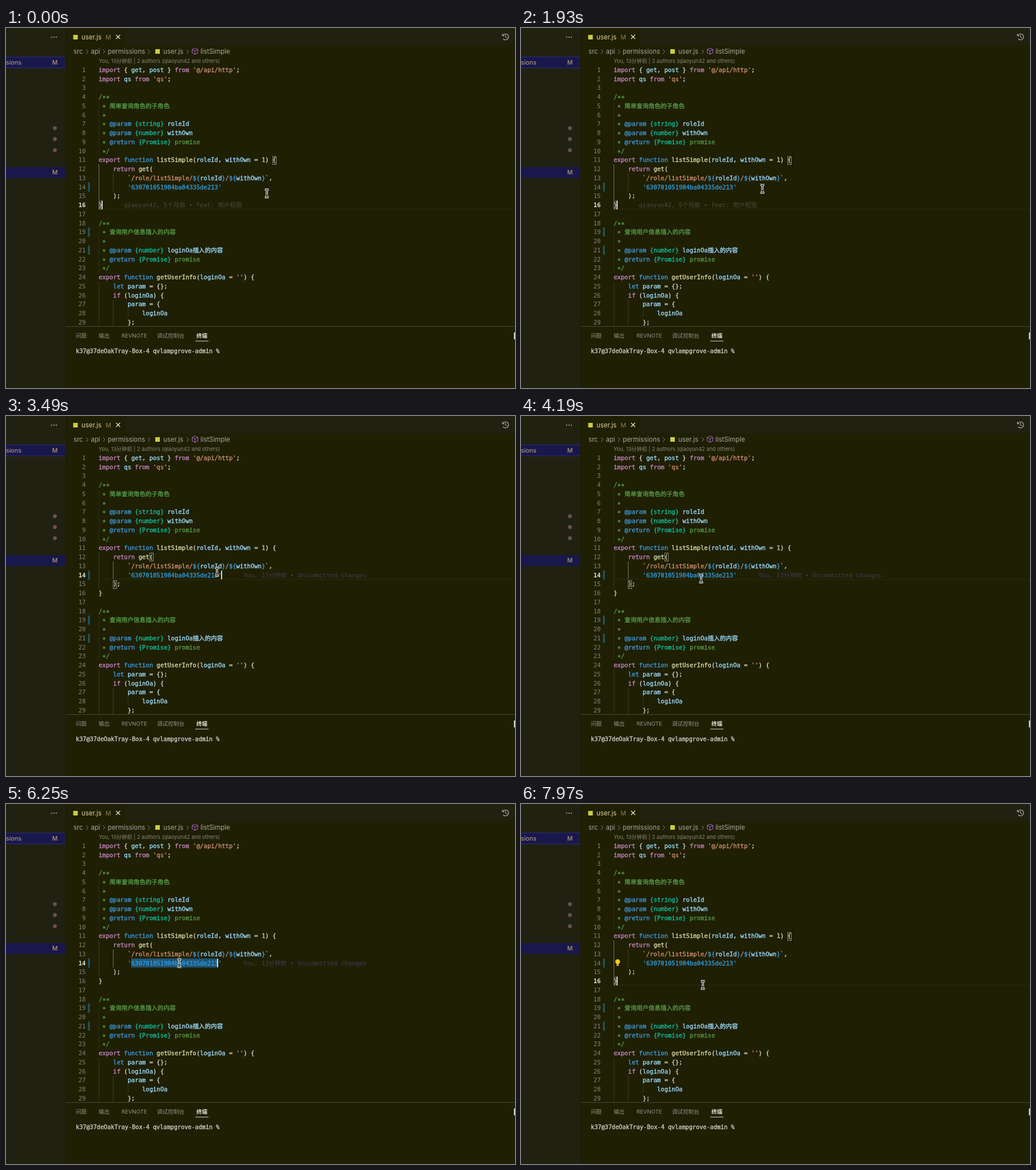
Recreate the animation shown at these times as an HTML page with a canvas. Size 890 px wide and 629 px high, loop 8 s.

```html
<!DOCTYPE html>
<html lang="zh">
<head>
<meta charset="utf-8">
<title>Editor</title>
<style>
  html, body { margin: 0; width: 100%; height: 100%; overflow: hidden; background: #1f1f03; }
  canvas { display: block; }
</style>
</head>
<body>
<canvas id="stage" width="890" height="629"></canvas>
<script>
const ctx = document.getElementById('stage').getContext('2d');
const LOOP = 8000;
const MONO = '"DejaVu Sans Mono", "Noto Sans CJK SC", monospace';
const UI = 'Inter, "Noto Sans CJK SC", sans-serif';
const BG = '#1f1f03', SIDE = '#212112';
const LEFT = 162, CELL = 6.333, ROW = 15.75, SIZE = 10.52;

const COLORS = {
  k: '#c586c0', b: '#3f9bdc', v: '#9cdcfe', w: '#d8d8d0', s: '#d08f70',
  h: '#2f9de0', c: '#559a48', t: '#10bfa0', f: '#dcdcaa', n: '#b5cea8'
};

// Each run is "colour key ~ text", runs are split by "|".
const CODE = [
  "k~import |w~{ |v~get|w~, |v~post |w~} |k~from |s~'@/api/http'|w~;",
  "k~import |v~qs |k~from |s~'qs'|w~;",
  "",
  "c~/**",
  "c~ * 简单查询角色的子角色",
  "c~ *",
  "c~ * |b~@param |t~{string} |v~roleId",
  "c~ * |b~@param |t~{number} |v~withOwn",
  "c~ * |b~@return |t~{Promise} |c~promise",
  "c~ */",
  "k~export |b~function |f~listSimple|w~(|v~roleId|w~, |v~withOwn |w~= |n~1|w~) {",
  "k~    return |f~get|w~(",
  "s~        `/role/listSimple/|b~${|v~roleId|b~}|s~/|b~${|v~withOwn|b~}|s~`|w~,",
  "h~        '630701051984ba04335de213'",
  "w~    );",
  "w~}",
  "",
  "c~/**",
  "c~ * 查询用户信息插入的内容",
  "c~ *",
  "c~ * |b~@param |t~{number} |v~loginOa插入的内容",
  "c~ * |b~@return |t~{Promise} |c~promise",
  "c~ */",
  "k~export |b~function |f~getUserInfo|w~(|v~loginOa |w~= |s~''|w~) {",
  "b~    let |v~param |w~= {};",
  "k~    if |w~(|v~loginOa|w~) {",
  "v~        param |w~= {",
  "v~            loginOa",
  "w~        };"
].map(line => line ? line.replace(/\*/g, '∗').split('|').map(run => run.split('~')) : []);

// Pointer path: time, x, y
const PATH = [
  [0, 456, 289], [20, 456, 289], [900, 450, 291], [1660, 422, 281], [2000, 422, 281],
  [2380, 384, 278], [2900, 384, 278], [3490, 369, 272], [4190, 315, 284],
  [4400, 315, 284], [5200, 303, 278], [6800, 303, 278], [7550, 318, 316], [8000, 318, 316]
];

const CLICK = 2400, SELECT = 6050, LEAVE = 7750;

const rowY = n => 73 + ROW * (n - 1);
const colX = c => LEFT + CELL * c;

function rect(x, y, w, h, color) {
  ctx.fillStyle = color;
  ctx.fillRect(x, y, w, h);
}

function text(str, x, y, color, size, family = UI, weight = 400, align = 'left') {
  ctx.font = `${weight} ${size}px ${family}`;
  ctx.textAlign = align;
  ctx.fillStyle = color;
  ctx.fillText(str, x, y + size * 0.36);
  return ctx.measureText(str).width;
}

// Monospaced text, thickened slightly by an outline
function mono(str, x, y, color, size = SIZE, extra = 0.35) {
  const width = text(str, x, y, color, size, MONO);
  ctx.strokeStyle = color;
  ctx.lineWidth = extra;
  ctx.strokeText(str, x, y + size * 0.36);
  return width;
}

function line(points, color, width = 1) {
  ctx.strokeStyle = color;
  ctx.lineWidth = width;
  ctx.beginPath();
  points.forEach(([x, y], i) => i ? ctx.lineTo(x, y) : ctx.moveTo(x, y));
  ctx.stroke();
}

function disc(x, y, r, color) {
  ctx.fillStyle = color;
  ctx.beginPath();
  ctx.arc(x, y, r, 0, Math.PI * 2);
  ctx.fill();
}

function sidebar() {
  rect(0, 0, 105, 629, SIDE);
  for (const y of [51, 243]) {
    rect(0, y, 103, 19, '#18184c');
    text('M', 85.5, y + 9, '#b49a6c', 10.5, UI, 500, 'center');
  }
  rect(0, 50, 103, 1, '#28287c');
  rect(0, 69, 103, 1, '#28287c');
  text('sions', 0, 60, '#c4aa7c', 10.8);
  for (const y of [175, 194, 213.5]) disc(85.5, y, 3.4, '#695050');
  for (const x of [80, 84, 88]) disc(x, 16, 0.9, '#c8c8c0');
  rect(104, 0, 1, 629, '#1a1a06');
}

function cube(x, y) {
  const c = '#a868c8';
  line([[x, y - 5.5], [x + 5, y - 3], [x + 5, y + 3], [x, y + 5.5],
        [x - 5, y + 3], [x - 5, y - 3], [x, y - 5.5]], c);
  line([[x - 5, y - 3], [x, y - 0.5], [x + 5, y - 3]], c);
  line([[x, y - 0.5], [x, y + 5.5]], c);
}

function header() {
  rect(209, 0, 681, 30, SIDE);
  rect(117.5, 12, 8, 8, '#cbcb41');
  text('user.js', 132, 16, '#e2cf9c', 11.4);
  text('M', 179, 16, '#968259', 10.5, UI, 400, 'center');
  line([[192.5, 12], [199.5, 19]], '#e8e8e0', 1.2);
  line([[199.5, 12], [192.5, 19]], '#e8e8e0', 1.2);

  const grey = '#a8a8a0';
  [['src', 118], ['api', 148.5], ['permissions', 178], ['user.js', 275], ['listSimple', 340]]
    .forEach(([label, x]) => text(label, x, 41, grey, 11.4));
  for (const x of [140, 169.5, 248, 316])
    line([[x, 37.5], [x + 3.5, 41.3], [x, 45]], '#88887f');
  rect(261, 37, 8, 8, '#cbcb41');
  cube(330.5, 40.5);

  // History clock
  ctx.strokeStyle = '#b8b8b0';
  ctx.lineWidth = 1.1;
  ctx.beginPath();
  ctx.arc(873.5, 15.5, 5.3, -2.7, 2.5);
  ctx.stroke();
  line([[868, 10], [868, 13.7], [871.5, 13.7]], '#b8b8b0');
  line([[873.5, 12], [873.5, 16], [876.5, 17.5]], '#b8b8b0');
}

function guides(onBlock) {
  const dim = '#3a3a2c', lit = '#75756c';
  const guide = (col, from, to, color) =>
    rect(Math.round(colX(col)), rowY(from) - ROW / 2, 1, ROW * (to - from + 1), color);
  guide(0, 5, 10, '#2b2b18');
  guide(0, 12, 15, onBlock ? lit : dim);
  guide(4, 13, 14, onBlock ? dim : lit);
  guide(0, 19, 23, '#2b2b18');
  guide(0, 25, 29, dim);
  guide(4, 27, 29, dim);
  guide(8, 28, 28, dim);
}

function changeMark(n) {
  const y = rowY(n) - ROW / 2;
  ctx.save();
  ctx.beginPath();
  ctx.rect(143.5, y, 3, ROW);
  ctx.clip();
  for (let d = -2; d < ROW + 4; d += 3)
    line([[143, y + d + 2], [147, y + d - 2]], '#1f86b4', 1.3);
  ctx.restore();
}

function code(active) {
  CODE.forEach((runs, i) => {
    const n = i + 1, y = rowY(n), on = n === active;
    text(String(n), 139.3, y, on ? '#e0e0d8' : '#85857c', SIZE, MONO, on ? 700 : 400, 'right');
    ctx.textAlign = 'left';
    let x = LEFT;
    for (const [key, str] of runs) x += mono(str, x, y, COLORS[key]);
  });
  [14, 19, 21].forEach(changeMark);
}

function bracket(n, col) {
  ctx.strokeStyle = '#8c8c84';
  ctx.lineWidth = 1;
  ctx.strokeRect(Math.round(colX(col)) + 0.5, Math.round(rowY(n) - 7) + 0.5, 6, 14);
}

function caret(n, col, since, t) {
  if ((t - since) % 1000 < 500)
    rect(Math.floor(colX(col)) - 1, rowY(n) - 7.5, 2, 15, '#d8d8d0');
}

function bulb(x, y) {
  disc(x, y - 1.5, 4.2, '#ffc814');
  rect(x - 2, y + 1, 4, 2.5, '#ffc814');
  rect(x - 2, y + 4, 4, 1.6, '#d8d8c8');
}

function panel() {
  rect(105, 521, 785, 1, '#45453a');
  [['问题', 122], ['输出', 162], ['REVNOTE', 202], ['调试控制台', 264]]
    .forEach(([label, x]) => text(label, x, 538, '#92928a', 9.6));
  text('终端', 333, 538, '#e8e8e0', 9.6, UI, 600);
  rect(331, 546.5, 23, 1, '#d8d8d0');
  rect(888, 532, 2, 12, '#d0d0c8');
  mono('k37@37deOakTray-Box-4 qvlampgrove-admin %', 122, 564, '#d0d0c8', 10.2);
}

function pointer(t) {
  const i = PATH.findIndex((p, j) => j && t <= p[0]);
  const [t0, x0, y0] = PATH[i - 1], [t1, x1, y1] = PATH[i];
  const u = (t - t0) / (t1 - t0), e = u * u * (3 - 2 * u);
  const x = x0 + (x1 - x0) * e, y = y0 + (y1 - y0) * e;
  // Dark beam with a white rim
  for (const [color, width] of [['#fff', 3.4], ['#000', 1.1]]) {
    for (const s of [-1, 1])
      line([[x - 3.4, y + s * 7], [x - 1.2, y + s * 6.7], [x, y + s * 5.5],
            [x + 1.2, y + s * 6.7], [x + 3.4, y + s * 7]], color, width);
    line([[x, y - 6], [x, y + 6]], color, width);
    line([[x - 2.2, y + 3], [x + 2.2, y + 3]], color, Math.min(width, 2.2));
  }
}

function draw(t) {
  const onBlock = t < CLICK || t >= LEAVE;
  const selected = t >= SELECT && t < LEAVE;
  const active = onBlock ? 16 : 14;

  rect(0, 0, 890, 629, BG);
  sidebar();
  header();
  text('You, 13分钟前 | 2 authors (qiaoyun42 and others)', LEFT, 57.5, '#88887c', 9.2);
  guides(onBlock);
  if (selected) rect(colX(9), rowY(14) - ROW / 2, CELL * 24, ROW, '#205474');
  else rect(LEFT, Math.round(rowY(active) + ROW / 2) - 1, 728, 1, '#2a2a12');
  code(active);

  if (onBlock) {
    bracket(11, 48);
    bracket(16, 0);
    caret(16, 1, t < CLICK ? -250 : LEAVE, t);
  } else if (selected) {
    caret(14, 33, SELECT, t);
  } else {
    bracket(12, 14);
    bracket(15, 4);
    caret(14, 34, CLICK, t);
  }

  if (t < CLICK)
    text('qiaoyun42, 5个月前 • feat: 用户权限', 206, rowY(16), '#4a4a42', SIZE, MONO);
  if (t >= CLICK + 300 && t < LEAVE)
    text('You, 13分钟前 • Uncommitted changes', 415, rowY(14), '#3c3c58', SIZE, MONO);
  if (t >= SELECT + 500) bulb(169, 277);

  panel();
  pointer(t);
}

function tick() {
  draw(performance.now() % LOOP);
  requestAnimationFrame(tick);
}
tick();
</script>
</body>
</html>
```
